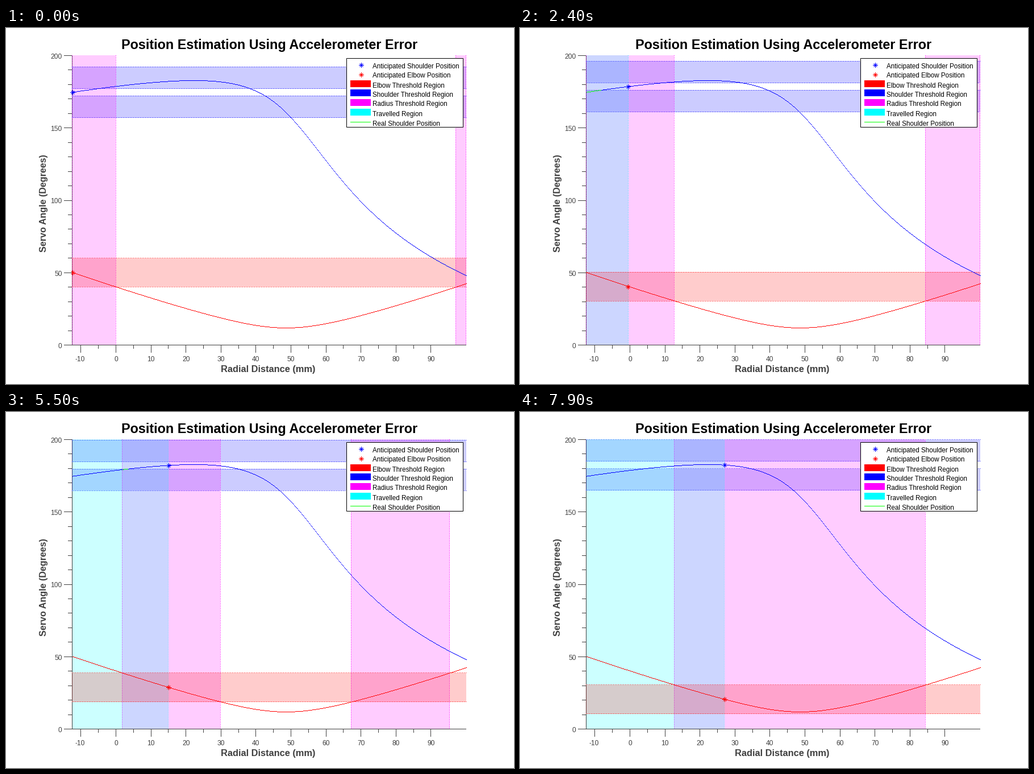
Animation of 894x626 px, one loop 8000 ms. Source, as a matplotlib script:

```python
import numpy as np
import matplotlib.pyplot as plt
from matplotlib.animation import FuncAnimation
from matplotlib.patches import Rectangle
from matplotlib.path import Path

W, H, DPI = 894, 626, 64
PT = 72 / DPI                       # points per pixel
FRAMES, INTERVAL = 80, 100
START, END, STEP = -12.5, 100.0, 0.5
LEFT, RIGHT, TOP, BOTTOM = 116, 810, 48, 558
SCALE = 6.16                        # pixels per millimetre
GRAY = "#404040"
BLUE, RED, MAGENTA, CYAN, GREEN = "#0000ff", "#ff0000", "#ff00ff", "#00ffff", "#00ff00"

# Two-link arm reaching for a point that passes by at a fixed offset
UPPER, FORE, OFFSET, MIDDLE, BASE = 65.6, 84.1, 24.0, 48.5, 26.35

# Asterisk with four long and four short arms
STAR = Path([(-1, 0), (1, 0), (0, -1), (0, 1),
             (-.65, -.65), (.65, .65), (-.65, .65), (.65, -.65)],
            [Path.MOVETO, Path.LINETO] * 4)


def px(v):
    return 116.5 + SCALE * (np.asarray(v) - START)


def py(v):
    return 557.5 - 2.545 * np.asarray(v)


def mid(v):
    """Centre of the pixel that holds v."""
    return np.floor(v) + 0.5


def elbow(x):
    r2 = OFFSET**2 + (x - MIDDLE) ** 2
    return np.degrees(np.arccos((UPPER**2 + FORE**2 - r2) / (2 * UPPER * FORE)))


def shoulder(x):
    d = x - MIDDLE
    r2 = OFFSET**2 + d**2
    inner = np.arccos((UPPER**2 + r2 - FORE**2) / (2 * UPPER * np.sqrt(r2)))
    return BASE + np.degrees(inner - np.arctan(d / OFFSET))


def reach(angle):
    """Distance from the middle at which the elbow has this angle."""
    r2 = UPPER**2 + FORE**2 - 2 * UPPER * FORE * np.cos(np.radians(angle))
    return np.sqrt(max(r2 - OFFSET**2, 0))


fig = plt.figure(figsize=(W / DPI, H / DPI), dpi=DPI, facecolor="white")
ax = fig.add_axes([0, 0, 1, 1])
ax.set_xlim(0, W)
ax.set_ylim(H, 0)
ax.axis("off")


def line(xs, ys, color, z, **kw):
    return ax.plot(xs, ys, color=color, lw=PT, zorder=z, snap=False,
                   solid_capstyle="butt", dash_capstyle="butt", **kw)[0]


def curve(xs, ys, color, z):
    """Hard-edged curve, one pixel per column."""
    return ax.plot(px(xs), mid(py(ys)), ",", color=color, zorder=z)[0]


def star(x, y, color, z):
    return ax.plot([x], [y], color=color, marker=STAR, ms=9 * PT, mew=PT,
                   mfc="none", ls="none", zorder=z)[0]


def text(x, y, s, size, color="black", ha="left", z=12, **kw):
    ax.text(x, y, s, size=size * PT, color=color, ha=ha, va="baseline",
            family="Liberation Sans", zorder=z, **kw)


class Region:
    """Translucent box with dotted lines on two opposite sides."""

    def __init__(self, color, z, upright):
        self.upright = upright
        self.box = Rectangle((0, 0), 0, 0, fc=color, ec="none", alpha=0.2, zorder=z)
        ax.add_patch(self.box)
        self.sides = [line([], [], color, z + 0.5, ls=(0, (1, 2)))
                      for _ in range(2)]

    def place(self, low, high, shown=True):
        if self.upright:
            x, y = px([low, high]), np.array([BOTTOM, TOP])
        else:
            x, y = np.array([LEFT, RIGHT]), py([low, min(high, 200)])
        self.box.set_bounds(x[0], y[1], x[1] - x[0], y[0] - y[1])
        for k, side in enumerate(self.sides):
            if self.upright:
                side.set_data([mid(x[k])] * 2, [TOP, BOTTOM])
            else:
                side.set_data(x, [mid(y[k])] * 2)
        for part in (self.box, *self.sides):
            part.set_visible(bool(shown))


# Axes, ticks and titles
line([116.5, 116.5], [TOP, BOTTOM], GRAY, 1)
line([LEFT, RIGHT], [557.5, 557.5], GRAY, 9)
for v in range(-10, 91, 5):
    major = v % 10 == 0
    line([mid(px(v))] * 2, [BOTTOM, 571 if major else 564], GRAY, 9)
    if major:
        text(px(v) - (1.5 if v < 0 else 0), 586.5, str(v), 12, GRAY, "center")
for v in range(0, 201, 10):
    major = v % 50 == 0
    line([102 if major else 109, LEFT], [mid(py(v))] * 2, GRAY, 9)
    if major:
        text(98.5, py(v) + 5.5, str(v), 12, GRAY, "right")
text(463.5, 36.5, "Position Estimation Using Accelerometer Error", 23.4,
     ha="center", weight="bold")
text(461.5, 605.5, "Radial Distance (mm)", 16.4, GRAY, "center", weight="bold")
text(71.5, 308, "Servo Angle (Degrees)", 16.1, GRAY, "center", weight="bold",
     rotation=90, rotation_mode="anchor")

# Legend
ax.add_patch(Rectangle((599.5, 53.5), 205, 121, fc="white", ec="black",
                       lw=PT, zorder=10, snap=False))
LEGEND = [
    ("Anticipated Shoulder Position", "star", BLUE),
    ("Anticipated Elbow Position", "star", RED),
    ("Elbow Threshold Region", "patch", RED),
    ("Shoulder Threshold Region", "patch", BLUE),
    ("Radius Threshold Region", "patch", MAGENTA),
    ("Travelled Region", "patch", CYAN),
    ("Real Shoulder Position", "line", GREEN),
]
for i, (label, kind, color) in enumerate(LEGEND):
    y = mid(64.5 + 16.75 * i)
    text(645, y + 6, label, 11.65)
    if kind == "star":
        star(624.5, y, color, 11)
    elif kind == "patch":
        ax.add_patch(Rectangle((606, y - 6.5), 36, 12, fc=color,
                               ec="none", zorder=11))
    else:
        line([606, 642], [y, y], color, 11)

# Curves
xs = START + np.arange(RIGHT - LEFT) / SCALE
arm = shoulder(xs)
curve(xs, arm, BLUE, 7)
curve(xs, elbow(xs), RED, 7)
real = curve([], [], GREEN, 7.5)

upper_band, lower_band = Region(BLUE, 2, False), Region(BLUE, 2, False)
left_zone, right_zone = Region(MAGENTA, 3, True), Region(MAGENTA, 3, True)
travelled = Region(CYAN, 4, True)
elbow_band = Region(RED, 5, False)
shoulder_mark = star(0, 0, BLUE, 8)
elbow_mark = star(0, 0, RED, 8)


def update(n):
    x = START + STEP * n
    e, s = elbow(x), shoulder(x)

    upper_band.place(s + 2.5, s + 17.5)
    lower_band.place(s - 17.5, s - 2.5)
    elbow_band.place(e - 10, e + 10)

    # Radii whose elbow angle lies within the threshold
    near, far = reach(e - 10), reach(e + 10)
    first, last = max(MIDDLE - far, START), min(MIDDLE + far, END)
    split = near > 0
    left_zone.place(first, MIDDLE - near if split else last)
    right_zone.place(MIDDLE + near, last, split)

    travelled.place(START, x, n > 0)
    travelled.sides[0].set_visible(False)
    travelled.sides[1].set_alpha(1 if first == START else 0.35)

    hit = (xs >= first) & (xs <= x) & (arm >= s - 17.5) & (arm <= s - 2.5)
    real.set_data(px(xs[hit]), mid(py(arm[hit])))

    shoulder_mark.set_data([px(x)], [py(s)])
    elbow_mark.set_data([px(x)], [py(e)])
    return []


anim = FuncAnimation(fig, update, frames=FRAMES, interval=INTERVAL,
                     init_func=lambda: update(0), repeat=True,
                     repeat_delay=0, blit=False)
plt.show()
```
